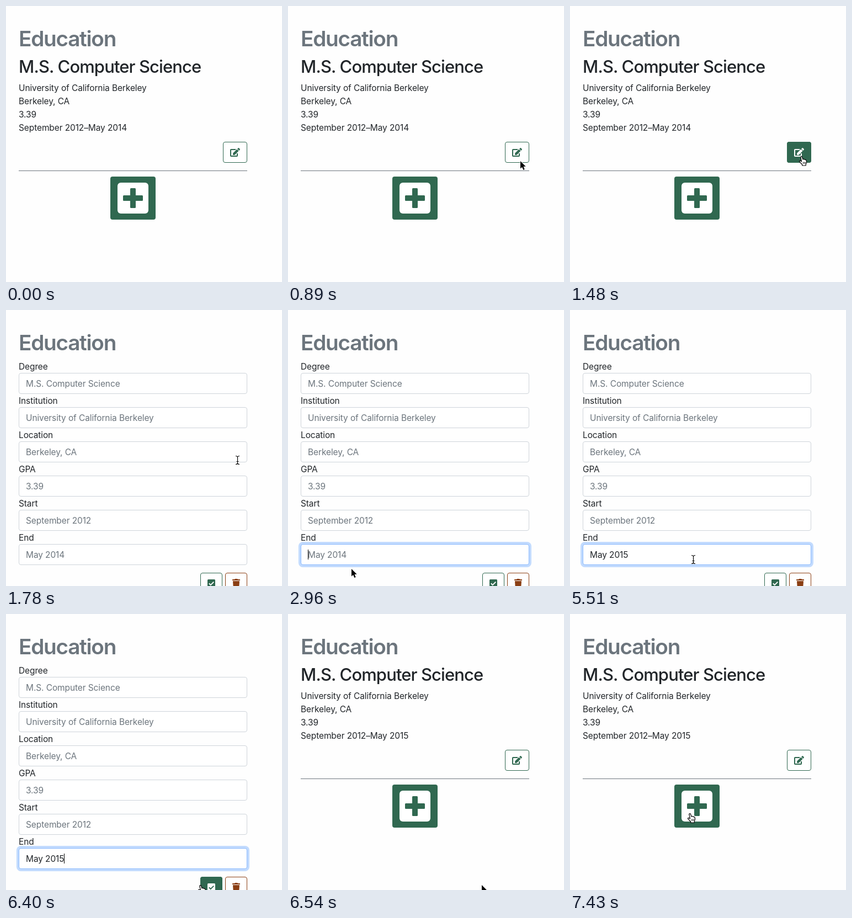
An HTML page that plays this animation: 500x500 px, repeating every 8000 ms.

```html
<!DOCTYPE html>
<html lang="en">
<head>
<meta charset="utf-8">
<title>Education form</title>
<style>
  html, body { margin: 0; width: 100%; height: 100%; overflow: hidden; background: #fefefe; }
  svg { display: block; width: 500px; height: 500px; }
  text { font: 400 15.5px Inter, "Open Sans", sans-serif; font-optical-sizing: none;
         letter-spacing: -.11px; fill: #212529; white-space: pre; }
  .title, .degree { font-weight: 500; letter-spacing: -.029em; }
  .title { font-size: 38.8px; font-weight: 600; letter-spacing: -.034em; fill: #6c757d; }
  .degree { font-size: 31px; }
  .hint { fill: #6c757d; }
  .box { fill: #fff; stroke: #ced4da; }
  .green { color: #306850; }
  .brown { color: #8b3f14; }
  .white { color: #fff; }
  .edge { fill: #fff; stroke: currentColor; }
</style>
</head>
<body>
<svg viewBox="0 0 500 500">
  <defs>
    <g id="pen">
      <path d="M10.2 3H1.8Q1 3 1 3.8V14.2Q1 15 1.8 15H12.2Q13 15 13 14.2V10" fill="none" stroke="currentColor" stroke-width="2"/>
      <path d="M12.4 2.5L15.5 5.6L8.6 12.7L5.5 13Q5 13 5 12.4L5.3 9.4Z" fill="currentColor"/>
      <path d="M13.2 1.8L14.4.5Q15.2-.2 16.1.4L17.6 1.9Q18.3 2.8 17.6 3.6L16.2 4.9Z" fill="currentColor"/>
    </g>
    <g id="tick">
      <rect y="1" width="14" height="14" rx="1.5" fill="currentColor"/>
      <path id="tickMark" d="M2.8 8.3L5.7 11.1L11.3 5.6" fill="none" stroke="#fff" stroke-width="1.9"/>
    </g>
    <g id="bin" fill="currentColor">
      <path d="M0 1.5Q0 1 .5 1H4L4.7 0H9.3L10 1H13.5Q14 1 14 1.5V3H0Z"/>
      <path d="M1 4H13L12.3 14.6Q12.2 16 10.8 16H3.2Q1.8 16 1.7 14.6Z"/>
    </g>
    <g id="arrow">
      <path d="M0 0V13.6L3.1 10.7L5.3 16L7.7 15L5.5 9.8H9.7Z" stroke="#fff" stroke-width="1.6" paint-order="stroke"/>
    </g>
    <g id="hand" fill="#fff" stroke="#000" stroke-width="1.2" stroke-linejoin="round">
      <path d="M-1.3 1.4Q.2-.2 1.6 1.4L2.8 5.8Q4.3 4.8 5.1 6Q6.7 5.4 7.3 6.7Q8.9 6.5 9.3 8L9.5 10.6Q9.3 13.5 8.2 15V17H1.7V15.4Q0 13 -2 11.5Q-4 9.6 -3.2 8.6Q-1.7 7.8 .5 9.8Z"/>
      <path d="M3.4 10.6v3.2M5.4 10.6v3.2M7.3 10.6v3.2" stroke-width=".9"/>
    </g>
    <g id="beam" fill="none">
      <path id="beamLine" d="M-3.5-7.5Q0-7.5 0-5.5V5.5Q0 7.5-3.5 7.5M3.5-7.5Q0-7.5 0-5.5M0 5.5Q0 7.5 3.5 7.5M-2 2.5H2" stroke="#fff" stroke-width="3" stroke-opacity=".8"/>
      <use href="#beamLine" style="stroke:#000"/>
      <path d="M-3.5-7.5Q0-7.5 0-5.5V5.5Q0 7.5-3.5 7.5M3.5-7.5Q0-7.5 0-5.5M0 5.5Q0 7.5 3.5 7.5M-2 2.5H2" stroke="#000" stroke-width="1.2"/>
    </g>
  </defs>

  <text class="title" x="23" y="73">Education</text>

  <g id="view">
    <text class="degree" x="23" y="121">M.S. Computer Science</text>
    <text x="23" y="154">University of California Berkeley</text>
    <text x="23" y="178">Berkeley, CA</text>
    <text x="23" y="202">3.39</text>
    <text id="dates" x="23" y="226"></text>
    <g class="green">
      <rect class="edge" x="393.5" y="246.5" width="43" height="37" rx="3.5"/>
      <use href="#pen" x="406" y="257"/>
      <g id="editHover">
        <rect x="393" y="246" width="44" height="38" rx="4" fill="currentColor"/>
        <use class="white" href="#pen" x="406" y="257"/>
      </g>
      <rect x="189" y="309" width="82" height="78" rx="4" fill="currentColor"/>
      <rect x="202" y="320" width="56" height="56" rx="6" fill="#fff"/>
      <rect x="212" y="343" width="36" height="10" rx="1.5" fill="currentColor"/>
      <rect x="225" y="330" width="10" height="36" rx="1.5" fill="currentColor"/>
    </g>
    <path d="M23 298.5H437" stroke="#6c757d"/>
  </g>

  <g id="form">
    <g id="fields"></g>
    <g id="focus">
      <rect x="19" y="420" width="422" height="46" rx="8" fill="#c2dbfe"/>
      <rect x="23.5" y="424.5" width="413" height="37" rx="3.5" fill="#fff" stroke="#86b7fe"/>
    </g>
    <text id="end" x="36" y="449"></text>
    <rect id="caret" y="434" width="1" height="18"/>
    <g class="green">
      <rect class="edge" x="352.5" y="476.5" width="39" height="37" rx="3.5"/>
      <use href="#tick" x="365" y="487"/>
      <g id="saveHover">
        <rect x="352" y="476" width="40" height="38" rx="4" fill="currentColor"/>
        <use class="white" href="#tick" x="365" y="487"/>
        <path d="M367.8 495.3L370.7 498.1L376.3 492.6" fill="none" stroke="currentColor" stroke-width="1.9"/>
      </g>
    </g>
    <g class="brown">
      <rect class="edge" x="397.5" y="476.5" width="39" height="37" rx="3.5"/>
      <use href="#bin" x="410" y="487"/>
    </g>
  </g>

  <use id="cursor"/>
</svg>
<script>
const $ = id => document.getElementById(id);
const LOOP = 8000, OPEN = 1780, TYPE = 3410, SAVE = 6540;

// Every track is a list of [start, ...values]; values hold until the next start.
const cursorTrack = [
  [0, ''], [740, 'arrow', 463, 300], [890, 'arrow', 421, 281],
  [1340, 'arrow', 421, 281], [1480, 'hand', 419, 272], [OPEN, 'beam', 419.5, 272],
  [2080, 'beam', 376, 308], [2230, 'beam', 285, 365], [2380, 'beam', 180, 418],
  [2520, 'beam', 124, 442], [2670, 'beam', 116, 448], [2960, 'arrow', 115, 469],
  [5510, 'beam', 223.5, 452], [5660, 'beam', 258, 460], [5800, 'arrow', 312, 476],
  [5950, 'arrow', 340, 487], [6100, 'arrow', 349, 490], [6250, 'hand', 352, 491],
  [SAVE, 'arrow', 351, 491], [6690, 'arrow', 345, 462], [6840, 'arrow', 318, 380],
  [6990, 'arrow', 282, 306], [7130, 'hand', 245, 318], [7280, 'hand', 224, 347],
  [7430, 'hand', 217, 361]
];
const typeTrack = [[0, ''], [TYPE, 'M'], [3860, 'May '], [4160, 'May 2'],
  [4310, 'May 20'], [4610, 'May 201'], [5060, 'May 2015']];
const caretTrack = [[0, 0], [2820, 1], [TYPE, 0], [3560, 1], [5510, 0], [6100, 1]];
const editTrack = [[0, 0], [1340, .6], [1480, 1], [OPEN, 0]];
const saveTrack = [[0, 0], [6250, .6], [6400, 1]];
const focusTrack = [[0, 0], [2670, .5], [2820, 1]];

const at = (track, t) => track.findLast(step => step[0] <= t).slice(1);
const show = (id, amount) => $(id).setAttribute('opacity', +amount);

$('fields').innerHTML = [
  ['Degree', 'M.S. Computer Science'], ['Institution', 'University of California Berkeley'],
  ['Location', 'Berkeley, CA'], ['GPA', '3.39'], ['Start', 'September 2012'], ['End', '']
].map(([label, hint], i) => `<g transform="translate(0 ${i * 62})">
  <text x="23" y="108">${label}</text>
  <rect class="box" x="23.5" y="114.5" width="413" height="37" rx="3.5"/>
  <text class="hint" x="36" y="139">${hint}</text></g>`).join('');

function draw() {
  const t = performance.now() % LOOP;
  const editing = t >= OPEN && t < SAVE;
  $('view').style.display = editing ? 'none' : '';
  $('form').style.display = editing ? '' : 'none';
  $('dates').textContent = 'September 2012–May ' + (t < SAVE ? 2014 : 2015);

  show('editHover', at(editTrack, t));
  show('saveHover', at(saveTrack, t));
  show('focus', at(focusTrack, t));
  show('caret', at(caretTrack, t));

  const [typed] = at(typeTrack, t), end = $('end');
  end.textContent = typed || 'May 2014';
  end.setAttribute('class', typed ? '' : 'hint');
  if (editing) $('caret').setAttribute('x', 36 + (typed ? Math.round(end.getComputedTextLength()) : 0));

  const [shape, x = 0, y = 0] = at(cursorTrack, t);
  $('cursor').setAttribute('href', '#' + shape);
  $('cursor').setAttribute('transform', `translate(${x} ${y})`);
  requestAnimationFrame(draw);
}
draw();
</script>
</body>
</html>
```
